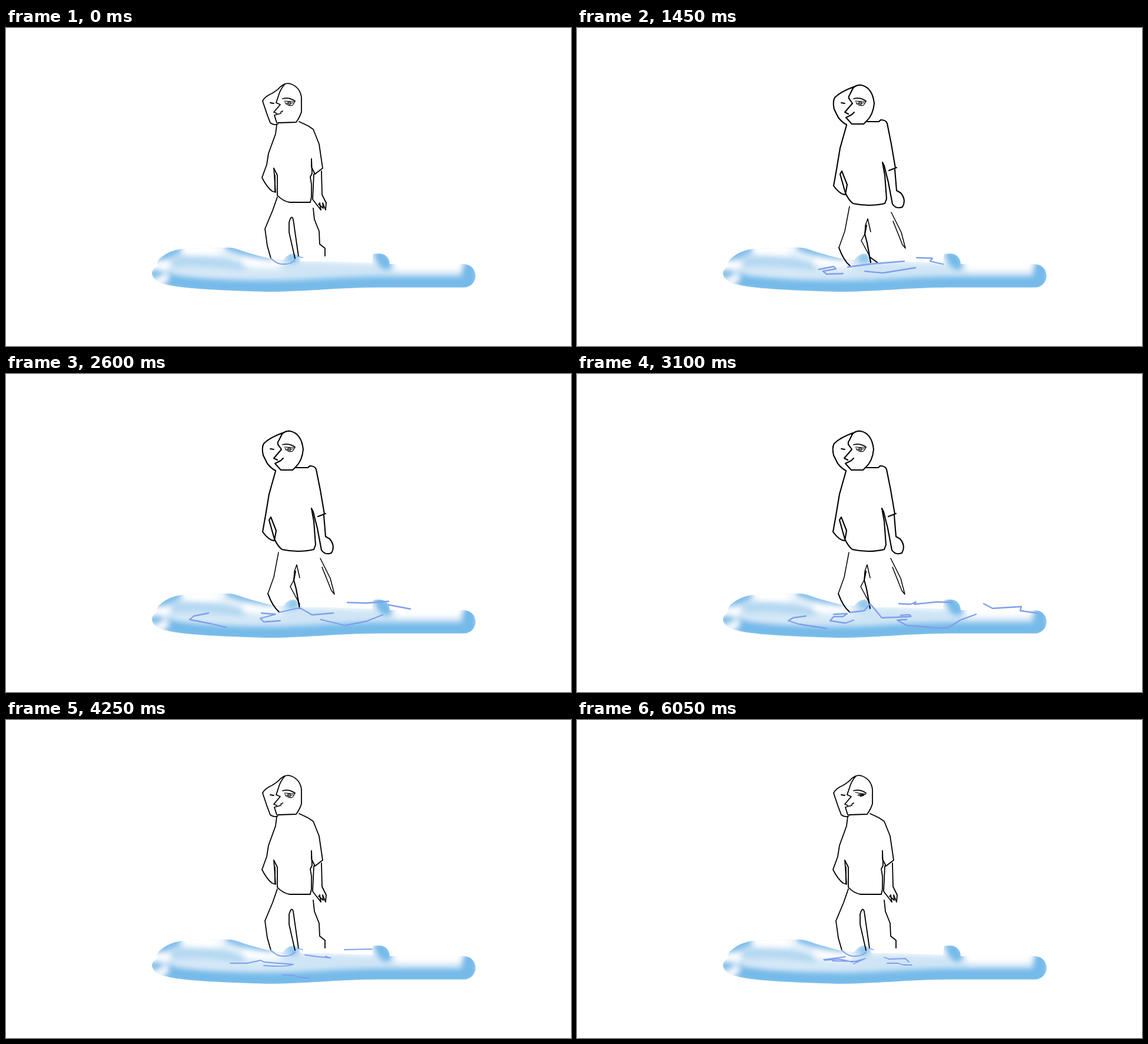
An HTML page that plays this animation: 960x540 px, repeating every 6.25 s.

```html
<!DOCTYPE html>
<html>
<head>
<meta charset="utf-8">
<title>Wading</title>
<style>
html, body { margin: 0; width: 100%; height: 100%; overflow: hidden; background: #fff; }
svg { display: block; width: 960px; height: 540px; }
path { fill: none; stroke-linecap: round; stroke-linejoin: round; }
.ink { stroke: #000; stroke-width: 1.8; }
#walking { stroke-width: 2.1; }
#eye { stroke-width: 1.2; }
#ripples { stroke: #7f9fea; }
.soft { filter: url(#blur); }
</style>
</head>
<body>
<svg viewBox="0 0 960 540">
  <defs>
    <filter id="blur" x="200" y="340" width="640" height="140" filterUnits="userSpaceOnUse">
      <feGaussianBlur stdDeviation="5"/>
    </filter>
    <clipPath id="shore">
      <path d="M248 415Q250 408 259 404Q254 398 262 391C273 382 285 376 302 375L372 373C387 371 402 380 420 384C440 390 455 394 471 394Q478 384 488 383Q498 385 501 396L540 396L622 399L624 384Q650 379 652 401H778A19.5 19.5 0 0 1 778 440.500H640C560 440.500 510 448 445 448C380 446 300 443 275 436Q248 431 248 415Z"/>
    </clipPath>
  </defs>

  <g clip-path="url(#shore)">
    <path d="M240 360H810V460H240Z" style="fill:#cfe5f6"/>
    <g class="soft">
      <path d="M290 397Q340 392 400 405" stroke="#b4d8f1" stroke-width="16"/>
      <path d="M290 415Q380 419 470 412" stroke="#d9ebf8" stroke-width="8"/>
      <path d="M504 391L622 395" stroke="#fff" stroke-width="10"/>
      <path d="M668 403H766" stroke="#fff" stroke-width="20"/>
      <path d="M308 374Q335 376 362 376" stroke="#fff" stroke-width="22"/>
      <path d="M362 378Q385 392 408 395" stroke="#e9f4fb" stroke-width="8"/>
      <path d="M408 397Q430 402 462 399" stroke="#fff" stroke-width="15"/>
      <path d="M276 428C310 437 380 441 445 441C520 441 560 434 640 434H785" stroke="#74bae9" stroke-width="24"/>
      <path d="M378 371Q410 382 448 388" stroke="#7dbeea" stroke-width="13"/>
      <path d="M256 391L290 374" stroke="#7dbeea" stroke-width="18"/>
      <path d="M246 417L258 416" stroke="#7dbeea" stroke-width="14"/>
      <path d="M486 391H490" stroke="#86c3eb" stroke-width="16"/>
      <path d="M636 388L646 400" stroke="#74bae9" stroke-width="21"/>
      <path d="M787 408V434" stroke="#74bae9" stroke-width="24"/>
      <path d="M244 403L272 402" stroke="#fff" stroke-width="14"/>
      <path d="M252 437L272 424" stroke="#fff" stroke-width="10"/>
    </g>
  </g>

  <g id="standing" class="ink">
    <path d="M462 163Q455 166 449 161L443 145L436 124Q440 116 452 111Q462 105 466 100Q475 92 484 95Q500 101 502 118V142Q500 150 493 160L462 161"/>
    <path d="M474 95Q466 104 463 115L459 127L466 130L455 143L460 145M467 145L456 148L460 161M467 143L470 141"/>
    <path d="M460 164L458 180L446 213L443 232L435 254Q443 270 452 277L458 279L456 250L455 238L461 250V284Q470 294 482 296H517L519 287V265L517 253L520 247L519 222L519 236L525 248L538 238L532 197L522 172L513 166L498 159"/>
    <path d="M523 248L521 291L535 309L533 297M536 243L537 283L544 297L543 309L538 297L539 306L531 299M457 250V277"/>
    <path d="M461 287L453 310L440 341L444 370L450 391M491 391L481 347L481 330Q485 316 488 325L497 388M522 306L524 325L532 345L533 367L542 374V387"/>
  </g>

  <g id="walking" class="ink">
    <path d="M457 164Q450 161 443 152L436 138Q433 125 437 118Q447 108 469 100M467 103Q473 96 482 97Q501 101 504 128Q502 148 491 158L486 163H466L456 152L466 147L470 143"/>
    <path d="M469 100L463 112Q459 118 462 121L467 128L454 143L460 146"/>
    <path d="M457 165L446 204L440 240L435 268Q446 283 455 283L458 266L449 243L446 248L455 280Q461 293 468 298Q495 304 522 298L525 290L522 250L518 228L521 234"/>
    <path d="M521 234L528 262L535 299Q541 308 552 304Q559 292 549 280L542 276L539 240M529 242L542 237M540 238L533 197L526 162Q524 156 515 156L512 159H492"/>
    <path stroke-width="1.5" d="M462 303L454 345L444 373M498 346L493 324L489 335L488 350L482 361L498 391M533 313L550 347L557 374L552 368L536 328"/>
    <path d="M444 373Q452 395 463 404M491 335L488 350L492 365L498 398"/>
    <path id="heel"/>
  </g>

  <path class="ink" d="M449 127L455 128M470 120Q481 117 491 124"/>
  <path id="eye" class="ink"/>
  <path id="ripples"/>
</svg>
<script>
const LOOP = 6250;
const OPEN = "M473 124L491 125L487 131Q479 134 474 126M479 125Q478 131 483 130Q486 125 480 126M475 129L488 127";
const SHUT = "M473 123L491 126L483 127L477 128L488 128L481 130L488 126L478 126";

const feet = "M450 391Q461 402 473 401Q485 401 491 394M496 388L504 390";
const calm = feet + "M381 413L410 413L433 408L438 411L488 415Q475 420 438 417M508 399L530 402L552 404M543 401L550 404M575 390L622 389M471 433H487L500 437L515 438";
const blink = feet + "M419 407L456 402M421 408L445 406L468 411L490 405L470 414M434 409L478 410M522 403L530 406L558 405L564 411M527 413H545L555 416L569 416";

// start time, pose, ripples, heel line, sway
const steps = [
  [0, "standing", feet],
  [1000, "walking", "M463 405L495 401M436 408L448 406L459 409L438 411L430 420L460 423L469 418M498 398L563 396L560 403L589 408M499 405L518 412L558 408M512 409L540 408", "M498 390L511 398"],
  [1450, "walking", "M411 410L436 405L440 409L418 413L424 418L452 417M460 406L497 401L556 396M489 413L520 416L575 407M577 390L604 391L600 396L622 401", "M498 390L509 398", 1],
  [1950, "walking", "M418 400L441 401L428 405L413 410Q418 415 440 414L454 409M418 400L440 404M463 404L500 398L535 395L556 392M429 433Q442 428 453 418L490 417L523 413M533 417L575 412L604 404M600 386L624 390L660 387L657 395L686 400", "M498 390L506 398"],
  [2600, "walking", "M344 406L319 411L312 417L348 424L374 430M434 406L458 408L432 415L438 421L466 419M463 405L499 397L520 409L556 406M535 417L576 427L612 420L640 409M580 388L612 389L650 386M650 392L687 399", "", 1],
  [3100, "walking", "M389 411L367 414L359 419L378 425L424 432M436 408L459 407L452 412L436 412L430 419L456 423L470 418M463 405L488 402L498 390L518 414L567 412Q569 407 550 410M547 390L567 391L576 387L573 391L612 387L638 388M678 408L651 418L632 430Q617 433 590 429L560 427L544 418L560 417M691 390L706 398L755 395L753 402L782 406"],
  [3750, "walking", "M408 410L385 415L381 420L404 426L440 431M437 409L459 407L433 414L440 421L468 418M463 405L498 394L518 412L562 410M566 390L600 387L642 389M692 411L657 422L605 428L566 420M714 393L735 401L778 399L776 405L805 409", "", 1],
  [4250, "standing", calm],
  [5050, "standing", blink, "", 0, SHUT],
  [5250, "standing", calm],
  [6050, "standing", blink, "", 0, SHUT]
];

const $ = id => document.getElementById(id);
const setPath = (id, d) => $(id).setAttribute("d", d);
let current;

function draw(now) {
  const time = now % LOOP;
  const step = steps.findLast(s => s[0] <= time);
  if (step !== current) {
    current = step;
    const [, pose, ripples, heel = "", sway = 0, eye = OPEN] = step;
    for (const id of ["standing", "walking"]) $(id).style.display = id === pose ? "" : "none";
    $("walking").setAttribute("transform", `translate(${sway} 0)`);
    setPath("ripples", ripples);
    setPath("heel", heel);
    setPath("eye", eye);
    $("ripples").style.strokeWidth = pose === "standing" ? 1.8 : 2.3;
  }
  requestAnimationFrame(draw);
}
draw(performance.now());
</script>
</body>
</html>
```
